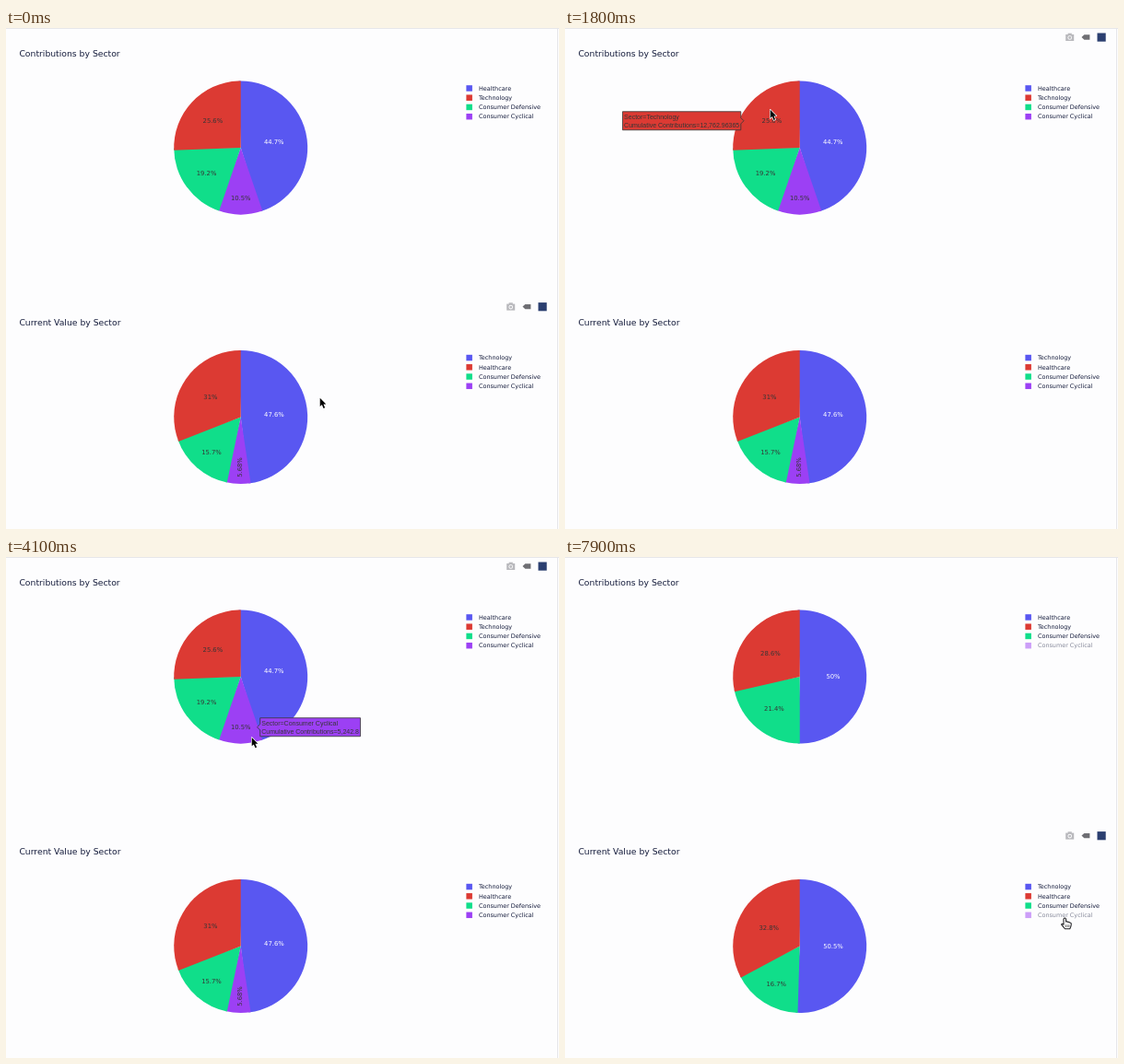
An HTML page with a canvas for the animation above (8 s loop, 600 px wide and 544 px high).

```html
<!DOCTYPE html>
<html lang="en">
<head>
<meta charset="utf-8">
<title>Sector charts</title>
<style>
html, body { margin: 0; width: 100%; height: 100%; overflow: hidden; background: #fdfdfe; }
canvas { display: block; width: 600px; height: 544px; }
</style>
</head>
<body>
<canvas id="stage"></canvas>
<script>
const W = 600, H = 544, LOOP = 8000, STEP = 100;
const R = 72.5, CX = 254.7, TAU = Math.PI * 2;
const SANS = '"DejaVu Sans", Verdana, sans-serif';
const ARIAL = '"Liberation Sans", Arial, sans-serif';
const COLORS = ['#5957f1', '#dc3a33', '#10de8a', '#9c40f4'];
const INK = '#131a3a', DARK = '#363636';

const charts = [
  {
    title: 'Contributions by Sector', top: 0, cy: 130, measure: 'Cumulative Contributions', hideAt: 4800,
    names: ['Healthcare', 'Technology', 'Consumer Defensive', 'Consumer Cyclical'],
    values: [22312.45, 12762.96365, 9560.31274625, 5242.8]
  },
  {
    title: 'Current Value by Sector', top: 292.6, cy: 422.5, measure: 'Daily Balance', hideAt: 6300,
    names: ['Technology', 'Healthcare', 'Consumer Defensive', 'Consumer Cyclical'],
    values: [41718.57, 27130.46, 13790.25, 4978.2]
  }
];

// pointer path: time, x, y
const path = [
  [0, 340, 401], [300, 225, 464], [500, 215, 390], [700, 213, 163], [800, 250, 182],
  [900, 298, 134], [1200, 298, 134], [1500, 285, 95], [1800, 222, 88], [2000, 222, 454],
  [2300, 250, 480.5], [2400, 256, 487], [2600, 292, 425], [2700, 235, 110], [2900, 295, 120],
  [3100, 288, 130], [3400, 225, 395], [3600, 224, 456], [3800, 252, 482], [3900, 262, 262],
  [4100, 266, 195.3], [4300, 216, 160], [4500, 300, 110], [4700, 535.5, 99.5],
  [5600, 535.5, 99.5], [6000, 542.5, 392]
];

const cv = document.getElementById('stage');
const dpr = window.devicePixelRatio || 1;
cv.width = W * dpr;
cv.height = H * dpr;
const c = cv.getContext('2d');

function pointer(t) {
  const i = path.findIndex(p => p[0] > t);
  if (i < 0) return path[path.length - 1].slice(1);
  const [t0, x0, y0] = path[i - 1], [t1, x1, y1] = path[i];
  const u = (t - t0) / (t1 - t0), e = u * u * (3 - 2 * u);
  return [x0 + (x1 - x0) * e, y0 + (y1 - y0) * e];
}

function text(s, x, y, size, color, family = SANS, align = 'left') {
  c.font = `${size}px ${family}`;
  c.textAlign = align;
  c.fillStyle = color;
  c.fillText(s, x, y + size * 0.36);
}

function shape(points, fill, stroke, width) {
  c.beginPath();
  points.forEach(([x, y]) => c.lineTo(x, y));
  c.closePath();
  c.fillStyle = fill;
  c.fill();
  if (stroke) {
    c.strokeStyle = stroke;
    c.lineWidth = width;
    c.stroke();
  }
}

// slices run clockwise from the top; each carries the centre of its inscribed circle
function slices(chart, t) {
  const order = t >= chart.hideAt ? [0, 2, 1] : [0, 3, 2, 1];
  const total = order.reduce((sum, i) => sum + chart.values[i], 0);
  let from = 0;
  return order.map(i => {
    const share = chart.values[i] / total, to = from + share * TAU;
    const mid = (from + to) / 2, half = Math.sin(Math.min(share * Math.PI, Math.PI / 2));
    const inner = half / (1 + half), d = R * (1 - inner);
    const s = {
      i, share, from, to, side: Math.sin(mid) < -1e-9 ? -1 : 1, inner: inner * R,
      x: CX + Math.sin(mid) * d, y: chart.cy - Math.cos(mid) * d
    };
    from = to;
    return s;
  });
}

function drawPie(chart, parts) {
  // neighbours overlap a little so that no seam shows between them
  parts.forEach((s, n) => {
    const start = n ? s.from : -0.03, end = n < parts.length - 1 ? s.to + 0.03 : TAU;
    c.beginPath();
    c.moveTo(CX, chart.cy);
    c.arc(CX, chart.cy, R, start - TAU / 4, end - TAU / 4);
    c.fillStyle = COLORS[s.i];
    c.fill();
  });
  for (const s of parts) {
    const label = Number((s.share * 100).toPrecision(3)) + '%';
    const color = s.i ? DARK : '#fff';
    if (s.share < 0.08) {
      c.save();
      c.translate(253.8, chart.cy + 54.5);
      c.rotate(-TAU / 4);
      text(label, 0, 0, 6.8, color, SANS, 'center');
      c.restore();
    } else {
      text(label, s.x, s.y, 6.8, color, SANS, 'center');
    }
  }
}

function drawLegend(chart, t) {
  chart.names.forEach((name, i) => {
    const y = chart.top + 65.4 + i * 10.25;
    c.globalAlpha = i === 3 && t >= chart.hideAt ? 0.5 : 1;
    c.fillStyle = COLORS[i];
    c.fillRect(499.4, y - 3.2, 6.5, 6.5);
    text(name, 513, y, 6.45, INK);
  });
  c.globalAlpha = 1;
}

function drawTools(top, alpha) {
  if (!alpha) return;
  const y = top + 10;
  c.globalAlpha = alpha;
  c.fillStyle = '#b9b9bd';
  c.fillRect(543.2, y - 3, 9, 7);
  c.fillRect(545.6, y - 4.3, 4.2, 2);
  c.beginPath();
  c.arc(547.7, y + 0.5, 2.3, 0, TAU);
  c.fillStyle = '#fdfdfe';
  c.fill();
  c.beginPath();
  c.arc(547.7, y + 0.5, 1.4, 0, TAU);
  c.fillStyle = '#b9b9bd';
  c.fill();
  shape([[560.5, y], [563.3, y - 2.7], [569.4, y - 2.7], [569.4, y + 2.7], [563.3, y + 2.7]], '#6f6f74');
  c.fillStyle = '#2b3f70';
  c.fillRect(577.5, y - 4.5, 9.2, 9.2);
  c.globalAlpha = 1;
}

function drawTip(chart, s) {
  const amount = chart.values[s.i].toLocaleString('en-US', { maximumFractionDigits: 8 });
  const lines = ['Sector=' + chart.names[s.i], chart.measure + '=' + amount];
  c.font = '7px ' + ARIAL;
  const w = Math.max(...lines.map(l => c.measureText(l).width)) + 3.2;
  const a = 3.2, h = 10, k = s.side, x = s.x + k * s.inner, y = s.y;
  const ink = s.i ? DARK : '#fff';
  const near = x + k * a, far = near + k * w;
  shape([
    [x, y], [near, y + a], [near, y + h], [far, y + h],
    [far, y - h], [near, y - h], [near, y - a]
  ], COLORS[s.i], ink, s.i ? 0.8 : 0.5);
  const left = Math.min(near, far) + 1.6;
  lines.forEach((l, i) => text(l, left, y - 4.5 + i * 9.1, 7, ink, ARIAL));
}

function drawArrow(x, y) {
  c.save();
  c.translate(x + 0.7, y + 0.8);
  c.lineJoin = 'round';
  const pts = [[0, 0], [0, 9.2], [2.1, 7.3], [3.8, 11.2], [5.4, 10.5], [3.7, 6.7], [6.6, 6.6]];
  shape(pts, '#000', '#fff', 1.4);
  shape(pts, '#000');
  c.restore();
}

function drawHand(x, y) {
  c.save();
  c.translate(x, y);
  c.scale(1.06, 1.02);
  c.lineJoin = 'round';
  c.beginPath();
  c.moveTo(-1.4, 7);
  c.lineTo(-1.4, 1);
  c.quadraticCurveTo(-0.2, -0.8, 1, 1);
  c.lineTo(1, 4);
  c.quadraticCurveTo(2.3, 3.2, 3, 4.4);
  c.quadraticCurveTo(4.2, 3.8, 4.8, 5);
  c.quadraticCurveTo(6.4, 4.8, 6.4, 6.4);
  c.quadraticCurveTo(6.4, 9, 5, 11.5);
  c.lineTo(0, 11.5);
  c.quadraticCurveTo(-1.8, 9.4, -3.6, 7);
  c.quadraticCurveTo(-3.4, 5.2, -1.4, 7);
  c.closePath();
  c.fillStyle = '#fff';
  c.fill();
  c.strokeStyle = '#1c1c20';
  c.lineWidth = 1;
  c.stroke();
  c.lineWidth = 0.6;
  c.beginPath();
  for (const dx of [0.9, 2.6, 4.2]) {
    c.moveTo(dx, 7.2);
    c.lineTo(dx, 9.8);
  }
  c.stroke();
  c.restore();
}

function draw(t) {
  c.setTransform(dpr, 0, 0, dpr, 0, 0);
  c.fillStyle = '#fdfdfe';
  c.fillRect(0, 0, W, H);
  c.fillStyle = '#e6e6ea';
  c.fillRect(0, 0, W, 1);
  c.fillRect(598, 0, 1, H);

  const [x, y] = pointer(t);
  const isLower = time => pointer(Math.max(0, time))[1] > 292 ? 1 : 0;
  const lower = (isLower(t) + isLower(t - STEP)) / 2;
  let tip = null, onLegend = false;

  charts.forEach((chart, n) => {
    const parts = slices(chart, t);
    text(chart.title, 14.4, chart.top + 27.2, 9.25, INK);
    drawPie(chart, parts);
    drawLegend(chart, t);
    drawTools(chart.top, n ? lower : 1 - lower);

    const dx = x - CX, dy = y - chart.cy;
    if (Math.hypot(dx, dy) < R) {
      const angle = (Math.atan2(dx, -dy) + TAU) % TAU;
      tip = [chart, parts.find(s => angle < s.to) || parts[0]];
    }
    const ly = y - chart.top;
    if (x > 497 && x < 582 && ly > 59 && ly < 102) onLegend = true;
  });

  if (tip) drawTip(...tip);
  (onLegend ? drawHand : drawArrow)(x, y);
}

const start = performance.now();
function tick() {
  const t = (performance.now() - start) % LOOP;
  draw(Math.floor(t / STEP) * STEP);
  requestAnimationFrame(tick);
}
tick();
</script>
</body>
</html>
```
